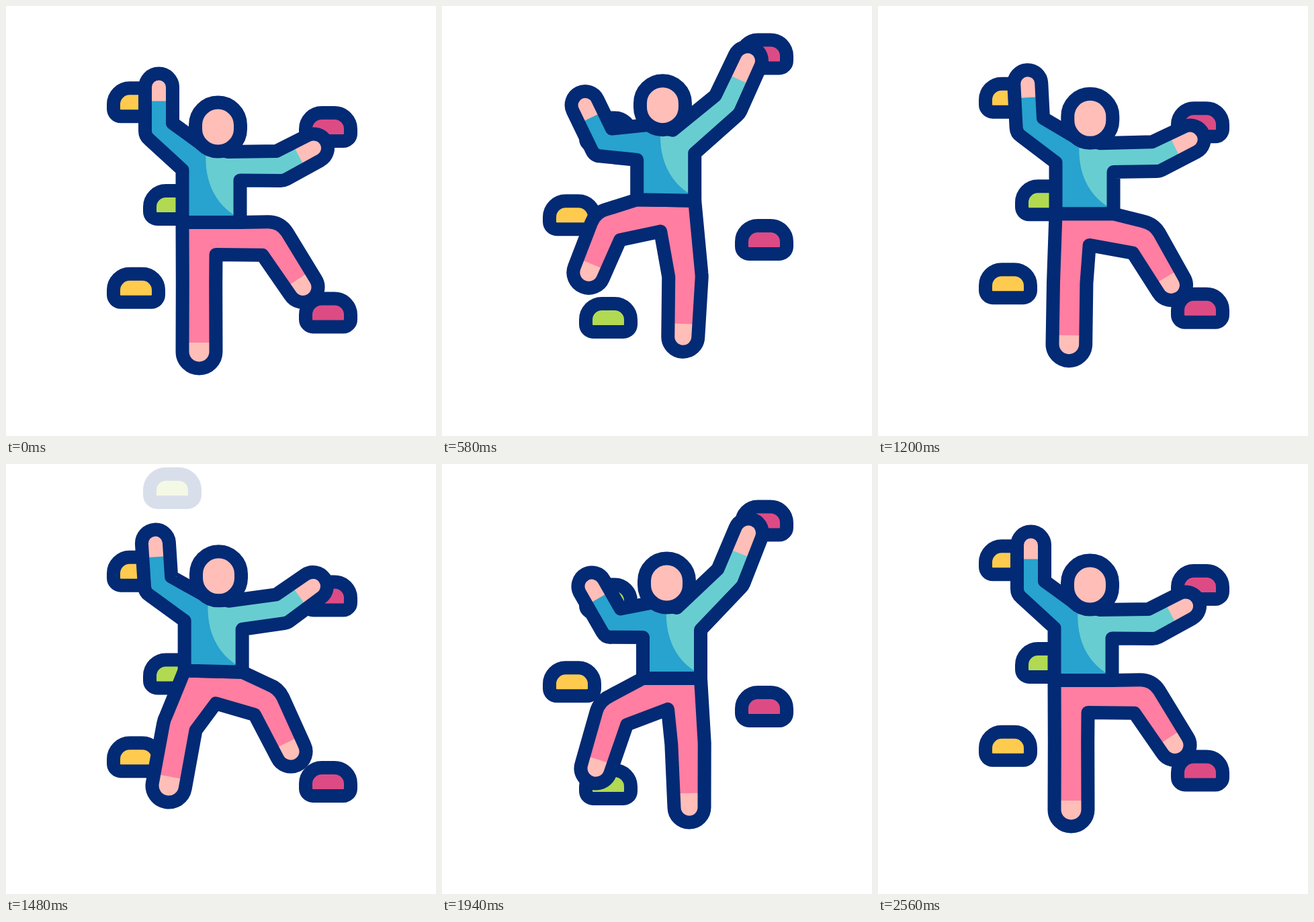
These frames come from a looping animation (640 px wide and 640 px high, 2.78 s). An HTML page:

```html
<!DOCTYPE html>
<html lang="en">
<head>
<meta charset="utf-8">
<title>Climber</title>
<style>
  html, body { margin: 0; width: 100%; height: 100%; overflow: hidden; background: #fff; }
  svg { display: block; width: 100vw; height: 100vh; }
  .line { fill: none; stroke: #032a74; stroke-width: 20; stroke-linejoin: round; }
  .skin { fill: #ffbeb8; }
</style>
</head>
<body>
<svg viewBox="0 0 640 640">
  <defs>
    <clipPath id="shirtClip"><path id="clipShape"/></clipPath>
  </defs>
  <g id="rocks"></g>
  <path id="pants" fill="#ff7ea1"/>
  <path id="feet" class="skin"/>
  <path id="pantsLine" class="line"/>
  <path id="shirt" fill="#28a2ce"/>
  <g clip-path="url(#shirtClip)">
    <path id="light" fill="#68cdd1" d="M-51-300V-102C-53-62-38-27-4-8L10 10H300V-300Z"/>
  </g>
  <path id="hands" class="skin"/>
  <path id="shirtLine" class="line"/>
  <g id="head">
    <rect x="-33.5" y="-36.5" width="67" height="73" rx="33.5" class="skin"/>
    <rect x="-33.5" y="-36.5" width="67" height="73" rx="33.5" class="line"/>
  </g>
</svg>
<script>
const LOOP = 2780, START = 200, CYCLE = 1180, TURN = 590;
const PERIOD = 276.5, FIRST_PULL = 181;
const NS = 'http://www.w3.org/2000/svg';
const $ = id => document.getElementById(id);

const ramp = (p, a, b) => Math.min(1, Math.max(0, (p - a) / (b - a)));
const ease = (p, a, b) => { const s = ramp(p, a, b); return s * s * (3 - 2 * s); };
const lerp = (a, b, k) => a + (b - a) * k;

// Each joint swings between two rest poses, bowed by one offset on the way out
// and another on the way back; a lead makes the sideways swing peak early.
const body = {
  waist: { low: [305.5, 322], high: [342, 319], out: [0, -42], back: [-2, -48] },
  elbowL: { low: [227.5, 184], high: [254.5, 237], out: [-11, -29], back: [-13, -37] },
  elbowR: { low: [408, 238], high: [429, 169], out: [1, -53], back: [15, -35] },
  handL: { low: [227.5, 121], high: [223, 182], out: [-15, -27], back: [-17, -37] },
  handR: { low: [458, 211.5], high: [456, 102.5], out: [-2, -65], back: [27, -21] },
  kneeL: { low: [287.5, 415], high: [255, 370], out: [-45, -73], back: [13, -1], lead: 2 },
  kneeR: { low: [395, 346], high: [366, 416], out: [-15, 4], back: [7, -20] },
  footL: { low: [287.5, 514.5], high: [229, 453], out: [-70, -97], back: [25, -25], lead: 2 },
  footR: { low: [442, 418.5], high: [368, 511], out: [-37, 5], back: [-1, -36] }
};
// Offsets from the waist; armpits keep their side in x.
const torso = {
  head: { low: [10, -142], high: [-7.5, -142], out: [-2, 1], back: [-2, 0] },
  pits: { low: [-78, -62.5], high: [-61, -72], out: [8, -1], back: [2, 3] },
  crotch: { low: [7, 48], high: [-6, 46], out: [-7, 0], back: [4, -5] }
};

function pose({ low, high, out, back, lead = 0 }, q, going) {
  const [from, to, bow] = going ? [low, high, out] : [high, low, back];
  const arch = 4 * q * (1 - q);
  return [
    lerp(from[0], to[0], q) + bow[0] * arch * (1 + lead * (0.5 - q)),
    lerp(from[1], to[1], q) + bow[1] * arch
  ];
}

const add = (a, b, k = 1) => [a[0] + b[0] * k, a[1] + b[1] * k];
const neg = a => [-a[0], -a[1]];
const mid = (a, b) => [(a[0] + b[0]) / 2, (a[1] + b[1]) / 2];
const fmt = p => p[0].toFixed(2) + ' ' + p[1].toFixed(2);
const normal = u => [-u[1], u[0]];
const dir = (a, b) => {
  const x = b[0] - a[0], y = b[1] - a[1], l = Math.hypot(x, y) || 1;
  return [x / l, y / l];
};

// Outline of a bent limb from one side round the tip to the other, and its bare end.
function limb(root, joint, tip, wJoint, wTip, cuff, round) {
  const u = dir(root, joint), v = dir(joint, tip), n = normal(u), m = normal(v);
  const bend = u[0] * v[1] - u[1] * v[0];
  const miter = wJoint / (1 + n[0] * m[0] + n[1] * m[1]);
  const corner = (side, before, after) => {
    const c = add(joint, add(n, m), side * miter);
    if (bend * side > 0) return 'L' + fmt(c);
    const r = round * Math.abs(bend);
    return 'L' + fmt(add(c, before, r)) + 'Q' + fmt(c) + ' ' + fmt(add(c, after, r));
  };
  const end = 'L' + fmt(add(tip, m, -wTip)) + `A${wTip} ${wTip} 0 0 1 ` + fmt(add(tip, m, wTip));
  const wrist = add(tip, v, -cuff);
  return {
    edge: corner(-1, neg(u), v) + end + corner(1, v, neg(u)),
    bare: 'M' + fmt(add(wrist, m, -wTip)) + end + 'L' + fmt(add(wrist, m, wTip)) + 'Z'
  };
}

const shown = () => 1;
const fadeIn = (a, b) => p => ramp(p, a, b);
const fadeOut = (a, b) => p => 1 - ramp(p, a, b);

const YELLOW = { color: '#ffcb4f', x: 150, y: 112.3 };
const PINK = { color: '#dd4b85', x: 436, y: 149 };
const GREEN = { color: '#b1da52', x: 204, y: 265 };
const rocks = [
  [YELLOW, -1, fadeIn(702, 788)], [YELLOW, 0, shown], [YELLOW, 1, fadeOut(260, 335)],
  [PINK, -1, fadeIn(284, 365)], [PINK, 0, shown], [PINK, 1, fadeOut(185, 255)],
  [GREEN, -1, fadeIn(90, 165)], [GREEN, 0, fadeOut(850, 930)]
].map(([kind, row, alpha]) => {
  const g = document.createElementNS(NS, 'g');
  const shape = document.createElementNS(NS, 'path');
  shape.setAttribute('d', 'M0 24a24 24 0 0 1 24-24h19a24 24 0 0 1 24 24v7a11 11 0 0 1-11 11H11a11 11 0 0 1-11-11z');
  shape.setAttribute('class', 'line');
  shape.style.fill = kind.color;
  g.append(shape);
  $('rocks').append(g);
  return { g, x: kind.x + 10, y: kind.y + 10 + row * PERIOD, alpha };
});

const setPath = (d, ...ids) => ids.forEach(id => $(id).setAttribute('d', d));
const move = (el, p) => el.setAttribute('transform', `translate(${fmt(p)})`);

function drawRocks(p, pull) {
  const dy = FIRST_PULL * ease(p, 21, 452) + (PERIOD - FIRST_PULL) * pull;
  for (const r of rocks) {
    move(r.g, [r.x, r.y + dy]);
    r.g.setAttribute('opacity', r.alpha(p));
  }
}

function drawBody(q, going) {
  const b = {}, off = {};
  for (const name in body) b[name] = pose(body[name], q, going);
  for (const name in torso) off[name] = pose(torso[name], q, going);
  const k = going ? q : 1 - q;

  const tilt = going ? 15 * q * (1 - q) * (2 - 2 * q) : 0;
  const waistL = add(b.waist, [-43, -tilt / 2]), waistR = add(b.waist, [43, tilt / 2]);
  const pitL = add(waistL, [0, off.pits[0]]), pitR = add(waistR, [0, off.pits[1]]);
  const crotch = add(b.waist, off.crotch), head = add(b.waist, off.head);
  const neckL = add(head, [-20, 29]), neckR = add(head, [15, 37]);

  const armL = limb(mid(pitL, neckL), b.elbowL, b.handL, 20.5, 20.5, 20.5, 10);
  const armR = limb(mid(pitR, neckR), b.elbowR, b.handR, 22, 21, lerp(25, 33, k), 10);
  const shirt = 'M' + fmt(waistL) + 'L' + fmt(pitL) + armL.edge +
    'L' + fmt(neckL) + 'L' + fmt(neckR) + armR.edge +
    'L' + fmt(pitR) + 'L' + fmt(waistR) + 'Z';
  setPath(shirt, 'shirt', 'shirtLine', 'clipShape');
  setPath(armL.bare + armR.bare, 'hands');
  move($('light'), waistR);

  const legL = limb(mid(waistL, crotch), b.kneeL, b.footL, 24.7, lerp(25, 22.5, k), 13.5, 22);
  const legR = limb(mid(waistR, crotch), b.kneeR, b.footR, 24.7, 22.5, lerp(14, 21, k), 22);
  const pants = 'M' + fmt(waistL) + 'L' + fmt(waistR) + legR.edge +
    'L' + fmt(crotch) + legL.edge + 'Z';
  setPath(pants, 'pants', 'pantsLine');
  setPath(legL.bare + legR.bare, 'feet');
  move($('head'), head);
}

function draw(time) {
  const t = time % LOOP - START;
  const p = t <= 0 || t >= 2 * CYCLE ? 0 : t % CYCLE;
  const going = p < TURN;
  const pull = ease(p, TURN, TURN + 490);
  drawRocks(p, pull);
  drawBody(going ? ease(p, 0, 560) : pull, going);
}

const begin = performance.now();
function tick() {
  draw(performance.now() - begin);
  requestAnimationFrame(tick);
}
tick();
</script>
</body>
</html>
```
